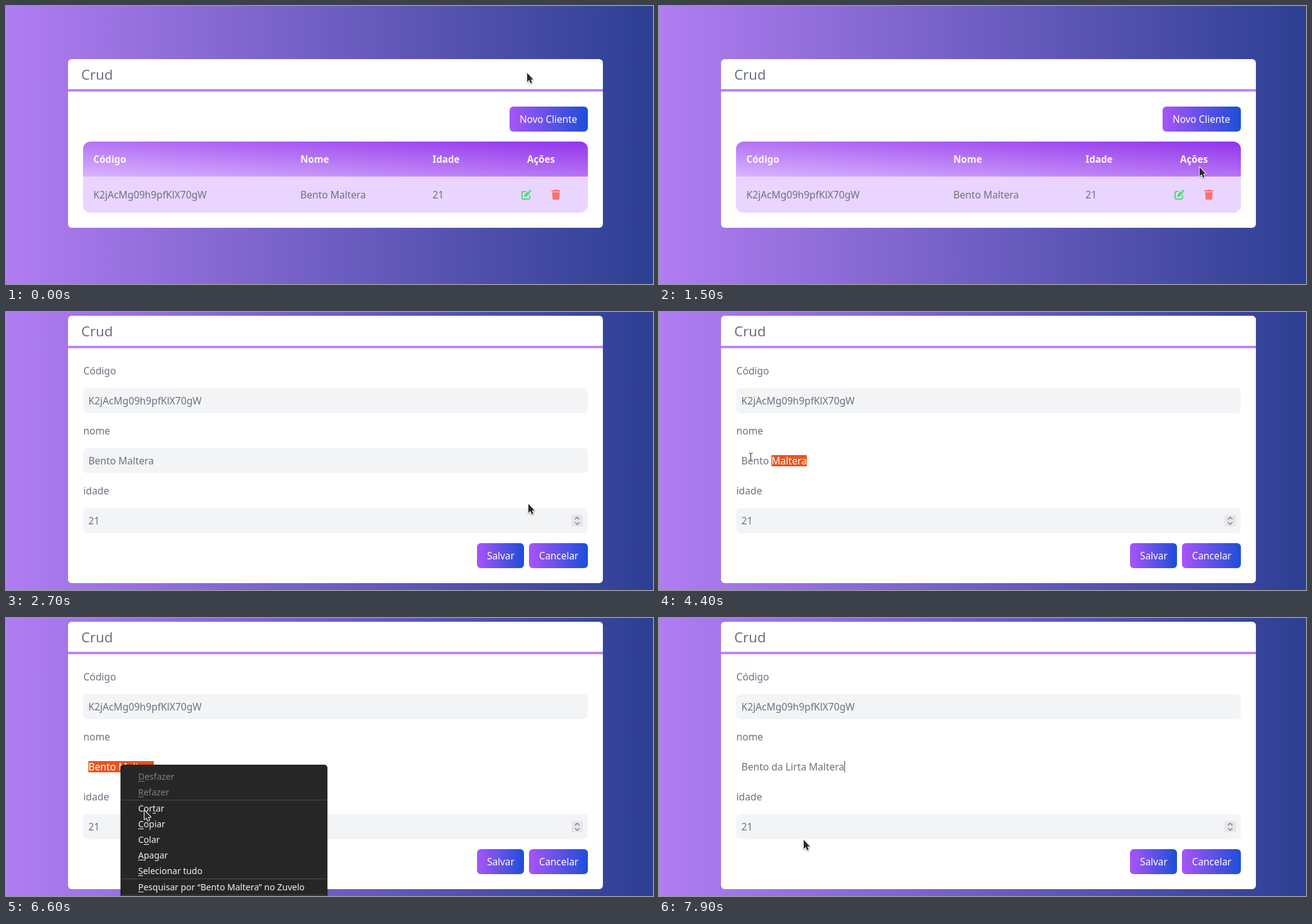
Animation of 1033x445 px, one loop 8000 ms. Source, as an HTML page with a canvas:

```html
<!DOCTYPE html>
<html lang="pt">
<head>
<meta charset="utf-8">
<title>Crud</title>
<style>
  html, body { margin: 0; width: 100%; height: 100%; overflow: hidden; }
  canvas { display: block; }
</style>
</head>
<body>
<canvas id="stage" width="1033" height="445"></canvas>
<script>
const ctx = document.getElementById('stage').getContext('2d');
const W = 1033, H = 445, LOOP = 8000, STEP = 100;
const GRAY = '#6b7280', ACCENT = '#e95420';
const font = (size, weight = 400) => `${weight} ${size}px "Noto Sans", "Open Sans", sans-serif`;
const BODY = font(15.7), BUTTON = font(15.4), HEAD = font(15.2, 600), TITLE = font(22.2), MENU = font(14);

const CODE = 'K2jAcMg09h9pfKlX70gW';
const NAME = 'Bento Maltera';
const LONG_NAME = 'Bento da Lirta Maltera';

const TIME = { form: 2700, beam: 3400, focus: 4200, select: 4300, menu: 5800, paste: 7900 };

// The pointer eases to each place and rests between moves.
const START = { x: 832, y: 107 };
const MOVES = [
  { from: 0, to: 400, x: 840, y: 53 },
  { from: 400, to: 900, x: 865, y: 197 },
  { from: 1300, to: 1500, x: 863, y: 258 },
  { from: 1500, to: 2200, x: 834, y: 307 },
  { from: 3000, to: 3200, x: 536, y: 252 },
  { from: 3300, to: 4200, x: 230, y: 232 },
  { from: 4200, to: 4500, x: 117, y: 232 },
  { from: 4600, to: 4900, x: 75, y: 236 },
  { from: 4900, to: 5300, x: 184, y: 234 },
  { from: 5900, to: 6400, x: 214, y: 290 },
  { from: 6500, to: 6600, x: 221, y: 308 },
  { from: 6600, to: 7100, x: 231, y: 355 }
];

const smooth = k => k * k * (3 - 2 * k);

function pointerAt(t) {
  let { x, y } = START;
  for (const move of MOVES) {
    if (t <= move.from) break;
    const k = smooth(Math.min(1, (t - move.from) / (move.to - move.from)));
    x += (move.x - x) * k;
    y += (move.y - y) * k;
  }
  return { x: Math.round(x), y: Math.round(y) };
}

const inside = (p, x, y, w, h) => p.x >= x && p.x < x + w && p.y >= y && p.y < y + h;
const overEdit = p => inside(p, 815, 286, 32, 32);

function box(x, y, w, h, fill, radius = 0) {
  ctx.fillStyle = fill;
  ctx.beginPath();
  ctx.roundRect(x, y, w, h, radius);
  ctx.fill();
}

function text(str, x, y, style = BODY, color = GRAY) {
  ctx.font = style;
  ctx.fillStyle = color;
  ctx.fillText(str, x, y);
}

function widthOf(str, style = BODY) {
  ctx.font = style;
  return ctx.measureText(str).width;
}

function gradient(x0, y0, x1, y1, from, to) {
  const g = ctx.createLinearGradient(x0, y0, x1, y1);
  g.addColorStop(0, from);
  g.addColorStop(1, to);
  return g;
}

function button(label, x, y, w, pointer) {
  const [from, to] = inside(pointer, x, y, w, 40) ? ['#9333ea', '#1e40af'] : ['#a855f7', '#1d4ed8'];
  box(x, y, w, 40, gradient(x, 0, x + w, 0, from, to), 6);
  text(label, x + 16, y + 26, BUTTON, '#fff');
}

function card(y, h) {
  box(99, y, 854, h, '#fff', 6);
  text('Crud', 120, y + 33, TITLE);
  box(99, y + 48, 854, 4, '#c084fc');
}

function editIcon(x, y, color) {
  ctx.save();
  ctx.translate(x, y);
  ctx.strokeStyle = ctx.fillStyle = color;
  ctx.lineWidth = 2;
  ctx.lineCap = 'round';
  ctx.stroke(new Path2D('M6 3H3Q1 3 1 5V13Q1 15 3 15H11Q13 15 13 13V10'));
  ctx.fill(new Path2D('M10.6 2.3L13.7 5.4L8.4 10.7L4.2 12L5.3 7.6Z'));
  ctx.fill(new Path2D('M11.3 1.6L12.5.5Q13.5-.2 14.4.7L15.4 1.7Q16.2 2.6 15.4 3.6L14.4 4.7Z'));
  ctx.restore();
}

function trashIcon(x, y) {
  ctx.save();
  ctx.translate(x, y);
  ctx.fillStyle = '#f87171';
  ctx.fill(new Path2D('M0 1H4L5 0H9L10 1H14V3H0ZM1 4H13L12.4 14.5Q12.2 16 11 16H3Q1.8 16 1.6 14.5Z'));
  ctx.restore();
}

function listPage(pointer) {
  const x = 123, y = 217, w = 806, h = 56;
  const cx = x + w / 2, cy = y + h / 2, k = w * h / (w * w + h * h);
  card(85, 270);
  button('Novo Cliente', 804, 161, 125, pointer);

  // Corner-to-corner gradient: the other two corners share the middle colour.
  box(x, y, w, h, gradient(cx - k * h, cy + k * w, cx + k * h, cy - k * w, '#d8b4fe', '#9333ea'), [12, 12, 0, 0]);
  box(x, y + h, w, 58, inside(pointer, x, y + h, w, 58) ? '#f1e7fd' : '#e9d5ff', [0, 0, 12, 12]);

  const columns = [['Código', 139.5, CODE], ['Nome', 470, NAME], ['Idade', 681, '21'], ['Ações', 832, '']];
  for (const [title, left, value] of columns) {
    text(title, left, 251, HEAD, '#fbf8ff');
    text(value, left, 308);
  }
  editIcon(823, 294, overEdit(pointer) ? '#16a34a' : '#4ade80');
  trashIcon(871, 294);
}

function field(label, value, y, focused) {
  text(label, 123.5, y - 22);
  if (!focused) box(123, y, 806, 40, '#f3f4f6', 7);
  text(value, 131.5, y + 26);
}

function spinner() {
  box(903, 325, 18, 18, '#e6e6ea');
  ctx.strokeStyle = '#77777d';
  ctx.lineWidth = 1.3;
  ctx.stroke(new Path2D('M908.5 332L912 328.5L915.5 332M908.5 336.5L912 340L915.5 336.5'));
}

function selectFrom(start) {
  const left = 131.5 + widthOf(NAME.slice(0, start));
  box(left, 229, widthOf(NAME.slice(start)), 18, ACCENT);
  text(NAME.slice(start), left, 244, BODY, '#fff');
}

function formPage(t, pointer) {
  const name = t >= TIME.paste ? LONG_NAME : NAME;
  const focused = t >= TIME.focus;
  const selecting = t >= TIME.select && t < TIME.paste;
  card(6, 428);
  [['Código', CODE], ['nome', name], ['idade', '21']].forEach(([label, value], i) =>
    field(label, value, 122 + 96 * i, focused && i === 1));
  spinner();
  button('Salvar', 752, 370, 75, pointer);
  button('Cancelar', 835, 370, 94, pointer);

  // The drag grows leftwards: part of a word, the word, the whole name.
  if (selecting) selectFrom(Math.max(0, 9 - 3 * (t - TIME.select) / STEP * (t > TIME.select + STEP ? 2 : 1)));
  else if (focused) box(Math.round(131.5 + widthOf(name)), 229, 1, 18, '#444');
  if (t >= TIME.menu && t < TIME.paste) contextMenu(t, pointer);
}

// "&" marks the underlined letter; each group ends with a rule.
const MENU_GROUPS = [
  ['&Desfazer', '&Refazer'],
  ['Cor&tar', '&Copiar', 'C&olar', '&Apagar', '&Selecionar tudo'],
  [`&Pesquisar por “${NAME}” no Zuvelo`]
];

function menuItem(label, y, enabled, hovered) {
  const key = label.indexOf('&'), plain = label.replace('&', '');
  const color = enabled ? '#f2f2f2' : '#7f7f7f';
  if (enabled && hovered) box(184, y, 328, 25, '#404040');
  text(plain, 211, y + 18, MENU, color);
  box(211 + widthOf(plain.slice(0, key), MENU), y + 20, widthOf(plain[key], MENU), 1, color);
}

function contextMenu(t, pointer) {
  ctx.save();
  ctx.shadowColor = 'rgba(0,0,0,.4)';
  ctx.shadowBlur = 3;
  box(183, 235, 330, 220, '#171717', 5);
  ctx.restore();
  box(184, 236, 328, 220, '#262626', 4);

  let y = 241;
  MENU_GROUPS.forEach((group, i) => {
    for (const label of group) {
      menuItem(label, y, i > 0, t > 6600 && inside(pointer, 184, y, 328, 25));
      y += 25;
    }
    box(184, y++, 328, 1, '#4b4b4b');
  });
}

const ARROW = new Path2D('M0 0V14.5L3.3 11.6L5.5 16.8L8 15.7L5.8 10.7H10Z');
const HAND = new Path2D('M-1.5 1Q-1.5-.5 0-.5Q1.5-.5 1.5 1V5L9 6.5Q11 7 11 9L10 14.5H1L-3 9.5Q-3.5 7.5-1.5 8Z');
const BEAM = new Path2D('M-3-6.5H-1L0-5.5L1-6.5H3M0-5.5V5.5M-3 6.5H-1L0 5.5L1 6.5H3');

function outline(shape, color, width) {
  ctx.strokeStyle = color;
  ctx.lineWidth = width;
  ctx.stroke(shape);
}

function drawPointer(t, p) {
  const hand = t < TIME.form && (inside(p, 804, 161, 125, 40) || overEdit(p));
  ctx.save();
  ctx.translate(p.x, p.y);
  ctx.lineJoin = 'round';
  if (t >= TIME.beam && t < TIME.menu) {
    ctx.translate(0.5, 0.5);
    outline(BEAM, '#fff', 2.6);
    outline(BEAM, '#222', 1);
  } else {
    const shape = hand ? HAND : ARROW;
    ctx.shadowColor = 'rgba(0,0,0,.4)';
    ctx.shadowBlur = 2;
    ctx.shadowOffsetY = 1;
    outline(shape, '#fff', 2);
    ctx.shadowColor = 'transparent';
    ctx.fillStyle = '#2b2b2b';
    ctx.fill(shape);
  }
  ctx.restore();
}

function draw() {
  const t = Math.floor(performance.now() % LOOP / STEP) * STEP;
  const pointer = pointerAt(t);
  box(0, 0, W, H, gradient(0, 0, W, 0, '#b17df2', '#2c3f92'));
  if (t < TIME.form) listPage(pointer);
  else formPage(t, pointer);
  drawPointer(t, pointer);
  requestAnimationFrame(draw);
}
draw();
</script>
</body>
</html>
```
